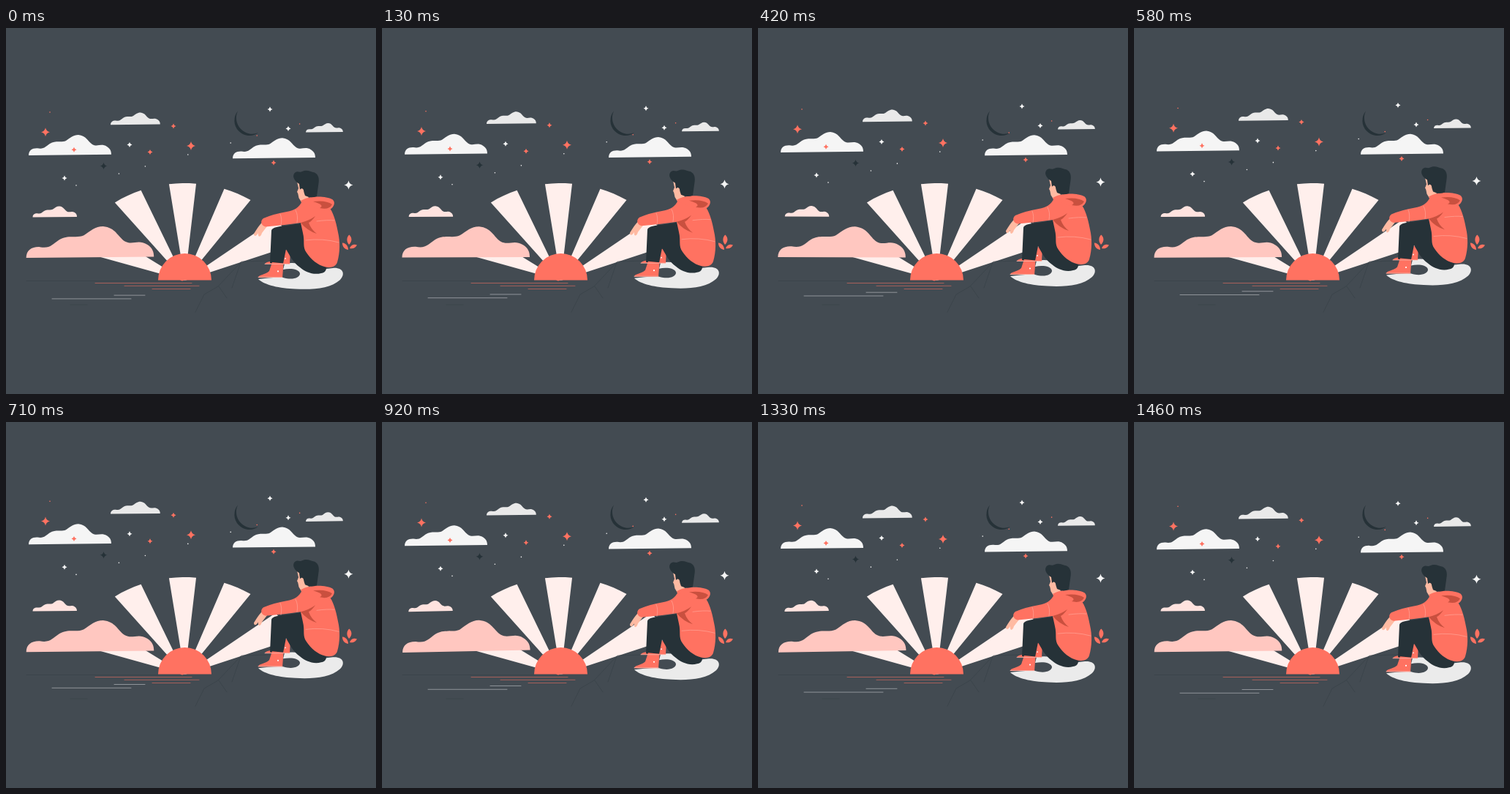
An HTML page for the animation above (1.5 s loop, 506 px wide and 500 px high).

```html
<!DOCTYPE html>
<html lang="en">
<head>
<meta charset="utf-8">
<title>Sunset dreamer</title>
<style>
  html, body { margin: 0; width: 100%; height: 100%; overflow: hidden; background: #434b52; }
  svg { display: block; width: 100%; height: 100%; }
  .coral { fill: #ff7261; }
  .dark { fill: #263238; }
  .skin { fill: #ffbaa2; }
  .shade { fill: #c9503f; }
  .line { fill: none; stroke-width: .7; stroke-linecap: round; stroke-linejoin: round; }
</style>
</head>
<body>
<svg viewBox="0 0 506 500">
  <defs>
    <path id="cloud" d="M0 28C0 21 5 18 12 18.3C21 20 23 16 29 12C37 7 45 11 51 8C57 4 61 0 68 0C79 1 81 9 87 13C94 17 99 11 107 16C112 19 113 23 113 26.8Z"/>
    <path id="star" d="M0-1Q.18-.18 1 0Q.18.18 0 1Q-.18.18-1 0Q-.18-.18 0-1Z"/>
  </defs>

  <path class="dark" d="M317 113.5A20.5 20.5 0 0 0 345 143A21.8 21.8 0 0 1 317 113.5Z"/>

  <!-- Sun, water and cracks in the ground -->
  <path id="rays" fill="#ffefec"/>
  <path class="coral" d="M208 344.500A36.5 36.5 0 0 1 281 344.500H244L241 345.500L238 344.500Z"/>
  <g class="line" stroke="#343d44">
    <path d="M28 345.500H208M88 378H111" opacity=".7"/>
    <path d="M360 318L322 319L290 353L271 364L259 388M321 320L309 355M291 353L302 369" opacity=".7"/>
  </g>
  <path class="line" stroke="#ff7261" opacity=".75" d="M122 348.500H254M162 352.300H264M200 356.500H252"/>

  <g id="wind">
    <use href="#cloud" transform="translate(36.5 243.6)scale(.535)" fill="#ffe3df"/>
    <use href="#cloud" transform="translate(27.7 271)scale(1.545)" fill="#ffc7c0"/>
  </g>

  <!-- Plant -->
  <g class="coral">
    <path d="M469 296C465 291 466 285 469.500 282.500C473 286 474 291 469 296Z"/>
    <path d="M468 303C462 302 460 298 460 293.500C465 294 468 298 468 303Z"/>
    <path d="M470 301C472 296 476 295 480 296.500C478 300 475 302 470 301Z"/>
  </g>

  <g id="float">
    <g fill="#f5f5f5">
      <use href="#cloud" x="31" y="146"/>
      <use href="#cloud" x="310" y="150.300"/>
    </g>
    <g fill="#e9e9e9">
      <use href="#cloud" transform="translate(143 115.500)scale(.6)"/>
      <use href="#cloud" transform="translate(410 130)scale(.45)"/>
    </g>
    <g id="stars"></g>
    <path class="line" stroke="#b0b4b8" d="M148 365.200H190M63 370H171"/>

    <!-- Seat -->
    <path d="M345 343C356 342 368 340 379 341C392 345 402 341 402 335.500C401 329 388 328 379 330L381 322C397 319 414 324 430 330L447 328C462 327 464 337 457 344C444 356 418 358 396 356.500C375 356 353 351 345 343Z" fill="#ebebeb"/>

    <!-- Shoes and legs -->
    <path class="coral" d="M380 303L389 303.500L388 322.500H354C355 319 363 319 370 317Z"/>
    <path class="dark" d="M363 277C364 271 377 271 403 267L414 295L436 321C440 328 438 334 431 335C420 338 409 333 402 327C393 321 388 311 383 302L379 322Q369 323 361 321Z"/>
    <path class="coral" d="M364 320L379.500 321.500L378 341H345C345 337 355 337 360 332Z"/>
    <path class="line" stroke="#ffc0b6" d="M354 322.500H388M345 340.500H378"/>
    <circle cx="372" cy="332.500" r="1.100" fill="#fff"/>
    <circle cx="382" cy="315" r=".9" fill="#fff"/>

    <!-- Hand, jacket and hood -->
    <path class="skin" d="M353 263C346 269 343 275 339 281C339 286 343 284 345 280C344 286 348 287 350 280L357 271Z"/>
    <path class="coral" d="M405 236C401 246 394 249 384 251Q366 254 352 260C347 264 349 270 355 271.500Q382 269 403 266L406 280C409 292 405 299 411 307C417 316 426 324 437 326.500C445 328 451 326 453 320C457 307 457 291 454 279C451 263 447 251 442 245Z"/>
    <path class="shade" d="M403 266Q415 263 423 257Q418 264 414 266Q417 275 425 281Q412 277 403 266Z"/>
    <path class="skin" d="M398 210L400 219L398 224C400 226 400 232 401 233L404 238L414 235L412 209Z"/>
    <path class="coral" d="M403 236C414 229 437 229 446 234C452 238 448 247 440 249C427 250 417 243 404 238Z"/>
    <path class="shade" d="M420 237Q438 235 446 241Q442 249 429 246Q437 242 420 237Z"/>
    <path class="line" stroke="#ffa599" d="M375 254Q378 261 376 270M396 249Q400 256 398 266M410 290Q433 287 455 293M425 264Q440 262 449 263"/>

    <!-- Head -->
    <path class="dark" d="M398 211C393 207 391 200 396 197C399 195 402 198 405 196C411 193 417 196 420 197C426 198 429 204 427.500 212L425 230Q417 233 409 229L407 223Q404 219 402 221L401 213Z"/>
    <path class="skin" d="M402 221C405 217 408 221 407 225C406 229 402 230 401 227Z"/>
  </g>
</svg>
<script>
  const PERIOD = 1500, LAG = 40, LIFT = 7;
  const CORAL = '#ff7261', WHITE = '#f5f5f5', DARK = '#263238';
  const get = id => document.getElementById(id);

  // Five evenly spaced wedges from the sun's centre, ending on a flat ellipse
  function ray(i) {
    const reach = i ? 1 : .8;
    const corner = offset => {
      const a = (156.5 - 32.6 * i + offset) * Math.PI / 180;
      const r = reach / Math.hypot(Math.cos(a) / 160, Math.sin(a) / 133);
      return `${244.500 + r * Math.cos(a)} ${345 - r * Math.sin(a)}`;
    };
    return `M244.500 345L${[8, 4, 0, -4, -8].map(corner).join('L')}Z`;
  }
  get('rays').setAttribute('d', [0, 1, 2, 3, 4].map(ray).join(''));

  // Sparkles by colour and size, then scattered dots
  const sparkles = (color, size, ...points) => points.map(([x, y]) =>
    `<use href="#star" fill="${color}" transform="translate(${x} ${y})scale(${size})"/>`).join('');
  const dot = i => {
    const x = 60 + 400 * (i * .618 % 1), y = 115 + 110 * (i * .382 % 1);
    return `<circle cx="${x}" cy="${y}" r=".8" fill="${i % 3 ? WHITE : CORAL}"/>`;
  };
  get('stars').innerHTML =
    sparkles(CORAL, 6, [54, 142.3], [253, 161]) +
    sparkles(CORAL, 3.5, [93, 166.3], [197, 169.5], [229, 134], [366, 184]) +
    sparkles(WHITE, 6, [468.5, 214.5]) +
    sparkles(WHITE, 3.5, [361, 111], [386, 137.5], [169, 159.5], [80, 205]) +
    sparkles(DARK, 4.8, [133.5, 188.5]) +
    Array.from({ length: 8 }, (_, i) => dot(i)).join('');

  // Triangle wave from 0 to 1 and back over one period
  const triangle = p => 1 - Math.abs(2 * (p % 1) - 1);

  function draw(now) {
    const p = (now + LAG) / PERIOD;
    get('float').setAttribute('transform', `translate(0 ${.3 - LIFT * triangle(p)})`);
    get('wind').setAttribute('transform', `rotate(${2 * triangle(p + .25) - 1} 115 279)`);
    requestAnimationFrame(draw);
  }
  draw(performance.now());
</script>
</body>
</html>
```
